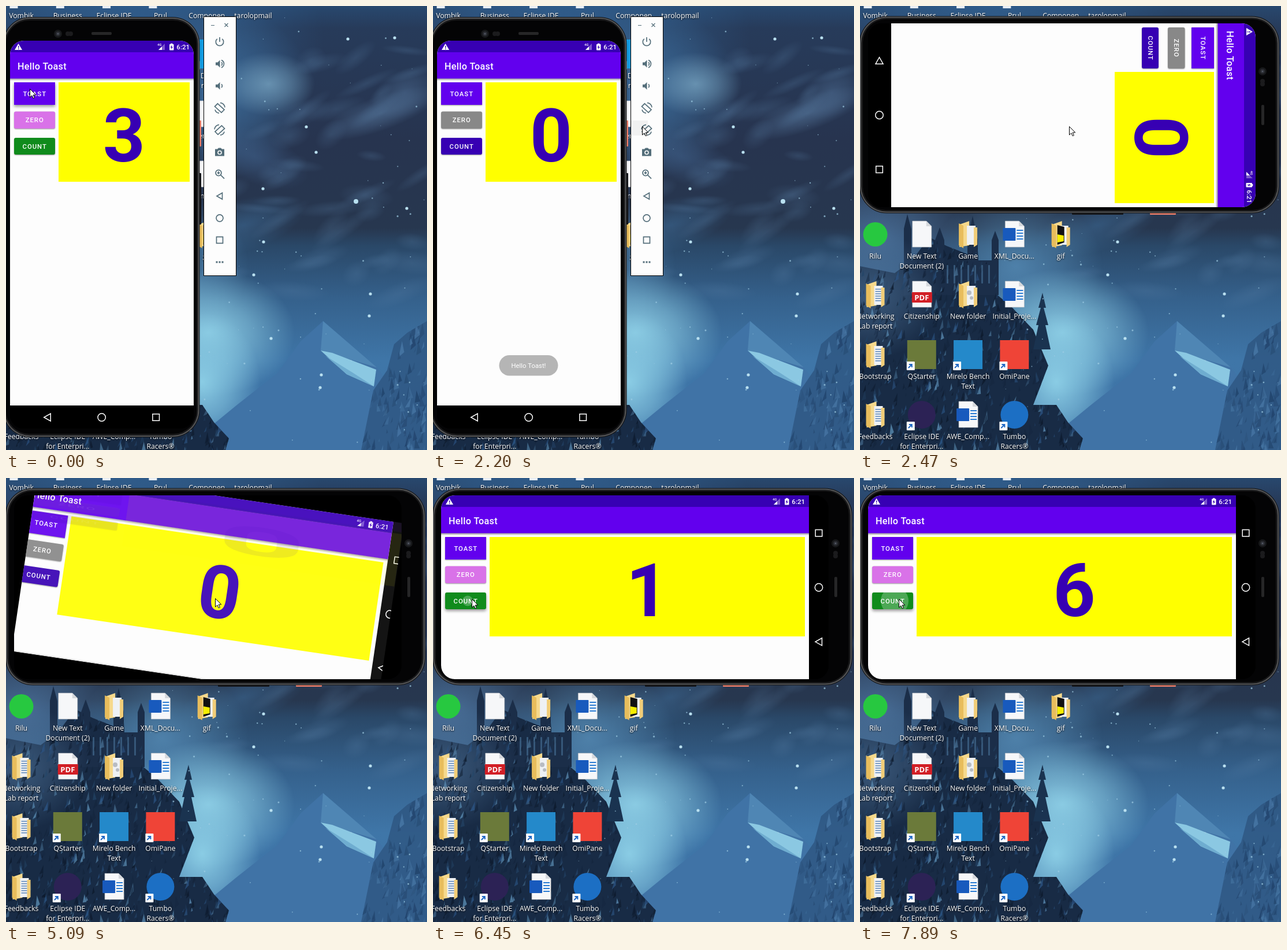
An HTML page with a canvas that plays this animation: 729x768 px, repeating every 8 s.

```html
<!DOCTYPE html>
<html lang="en">
<head>
<meta charset="utf-8">
<style>
html, body { margin: 0; width: 100%; height: 100%; overflow: hidden; }
canvas { display: block; }
</style>
</head>
<body>
<canvas id="stage" width="729" height="768"></canvas>
<script>
const stage = document.getElementById('stage');
const backdrop = document.createElement('canvas');
backdrop.width = 729; backdrop.height = 768;
let c = backdrop.getContext('2d');

let seed = 7;
const rnd = () => (seed = seed * 16807 % 2147483647) / 2147483647;

// ---- drawing helpers ----
function box(x, y, w, h, fill, r = 0) {
  c.fillStyle = fill;
  c.beginPath(); c.roundRect(x, y, w, h, r); c.fill();
}
function disc(x, y, r, fill) {
  c.fillStyle = fill;
  c.beginPath(); c.arc(x, y, r, 0, 7); c.fill();
}
function shape(d, fill, stroke, width = 1) {
  const p = new Path2D(d);
  if (fill) { c.fillStyle = fill; c.fill(p); }
  if (stroke) { c.strokeStyle = stroke; c.lineWidth = width; c.stroke(p); }
}
function text(s, x, y, font, fill, align = 'left', spacing = 0) {
  c.font = font; c.fillStyle = fill; c.textAlign = align;
  c.letterSpacing = spacing + 'px';
  c.fillText(s, x, y);
}
function at(x, y, draw, angle = 0, sx = 1, sy = sx) {
  c.save(); c.translate(x, y); c.rotate(angle); c.scale(sx, sy);
  draw(); c.restore();
}
function glow(x, y, rx, ry, rgb, alpha, angle = 0) {
  at(x, y, () => {
    const g = c.createRadialGradient(0, 0, 0, 0, 0, 1);
    g.addColorStop(0, `rgba(${rgb},${alpha})`);
    g.addColorStop(.5, `rgba(${rgb},${alpha * .55})`);
    g.addColorStop(1, `rgba(${rgb},0)`);
    c.fillStyle = g; c.fillRect(-1, -1, 2, 2);
  }, angle, rx, ry);
}

// ---- wallpaper ----
function shards(outline, x, y, w, h, count, size, colors) {
  c.save(); c.clip(new Path2D(outline));
  for (let i = 0; i < count; i++) {
    const px = x + rnd() * w, py = y + rnd() * h, s = size * (.4 + rnd());
    c.globalAlpha = .25 + rnd() * .5;
    shape(`M${px} ${py}l${s * (rnd() - .3)} ${s * 1.6}l${-s * .8} ${s * rnd()}z`,
      colors[i % colors.length]);
  }
  c.restore();
}

function wallpaper() {
  const g = c.createLinearGradient(0, 0, 0, 768);
  [[0, '#28486e'], [.05, '#273b5a'], [.3, '#27344f'], [.5, '#27374f'], [.54, '#2a4868'],
   [.66, '#35618c'], [.8, '#3f76a8'], [1, '#3d73a6']].forEach(s => g.addColorStop(...s));
  c.fillStyle = g; c.fillRect(0, 0, 729, 768);
  glow(220, 60, 330, 250, '52,104,156', .75);
  glow(370, 150, 160, 150, '62,110,156', .8);
  glow(455, 135, 80, 55, '125,170,198', .7);
  glow(650, 185, 110, 30, '88,122,160', .6, -.35);
  glow(690, 150, 60, 40, '80,112,150', .5, -.5);
  glow(430, 260, 100, 45, '62,94,135', .6, .4);
  glow(410, 380, 110, 45, '60,106,150', .6, -.3);
  glow(270, 450, 150, 130, '86,140,182', .8);
  glow(350, 565, 150, 110, '138,202,226', 1);
  glow(340, 650, 100, 120, '138,204,228', 1);
  for (let i = 0; i < 40; i++)
    glow(390 + rnd() * 340, 20 + rnd() * 480, 25 + rnd() * 40, 8 + rnd() * 14, '92,132,172', .22, rnd() - .8);

  shape('M345 735L400 690 470 635 510 580 549 545 642 625 690 690 729 768H340z', '#4073a6');
  shape('M549 545L642 625 545 596z', '#4f86b4');
  shape('M545 596L565 600 641 629 637 658 590 637z', '#8bc8e2');
  shape('M553 605L600 634 637 658 590 637z', '#6fadd0');

  const cliff = 'M636 665L660 630 672 585 695 565 729 545V768H615z';
  shape(cliff, 'rgba(45,83,126,.75)');
  shards(cliff, 610, 545, 120, 220, 160, 9, ['#1f4068', '#4a7aa8', '#274a72']);

  glow(30, 400, 170, 110, '74,112,154', .9);
  const rocks = 'M0 450L60 462 90 440 120 400 150 415 188 430 190 400 196 386 203 404 205 440 ' +
    '234 446 238 500 262 520 300 560 326 622 300 690 340 690 360 720 386 748 380 768H0z';
  shape(rocks, '#182b45');
  shape('M76 470V385l6-25 7 26V440H130V405l8-22 8 22V455H186V405l9-42 9 42V440H228V405l6-16 6 16V500H76z', '#1b2e49');
  glow(20, 500, 120, 110, '82,120,160', .6);
  shards(rocks, 0, 380, 390, 390, 1100, 7,
    ['#2d5788', '#0c1829', '#244669', '#0e1c30', '#5f93ba', '#14253d']);
  // castle arcade and pine
  c.globalAlpha = .6;
  for (let i = 0; i < 7; i++) box(150 + i * 12, 448, 3, 32, '#4a7399', 1);
  c.globalAlpha = 1;
  shape('M316 496l6 26h-4l8 30h-5l9 42h-30l9-42h-4l8-30h-4z', '#1a3350');

  // snow
  [[606, 338], [694, 350], [631, 498], [629, 536], [446, 408], [520, 209], [537, 253], [459, 575],
   [546, 638], [429, 465], [445, 316], [592, 57], [673, 55], [544, 660]]
    .forEach(([x, y], i) => disc(x, y, i ? 2.6 : 4, '#b9e0f0'));
  for (let i = 0; i < 110; i++) disc(250 + rnd() * 479, 20 + rnd() * 740, .5 + rnd() * 1.1, 'rgba(160,205,228,.7)');
}

// ---- desktop icons ----
function page() {
  shape('M-16-23H8l9 9V22H-16z', '#f6f7f9', '#b9bcc2', .7);
  shape('M8-23v9h9z', '#d5d8dc');
}
function folder() {
  shape('M-15-17L2-23V19L-15 22z', '#f6d98c');
  box(-2, -15, 15, 33, '#eef1f4');
  shape('M-16-19l8 4V24l-8-5z', '#e8bd5c');
  shape('M10-12h6V18l-6 4z', '#f1cd78');
}
function badge() {
  box(-26, 12, 14, 15, '#fff', 1);
  shape('M-23 23l6-6m-5 0h5v5', null, '#1d66c4', 2);
}
const square = color => () => { box(-25, -25, 50, 50, color); badge(); };
const round = color => () => { disc(0, 0, 24, color); badge(); };
const icons = {
  page, folder,
  doc() { page(); box(-20, -11, 22, 22, '#185abd', 1); for (let y = -8; y < 11; y += 5) box(4, y, 11, 2, '#2b7cd3'); },
  pdf() { page(); box(-17, -4, 35, 18, '#d21f26', 1); text('PDF', 0, 10, 'bold 13px "Open Sans", sans-serif', '#fff', 'center'); },
  gears() { folder(); disc(2, -3, 4, '#b8bcc2'); disc(6, 6, 3, '#b8bcc2'); },
  papers() { folder(); for (let y = -10; y < 14; y += 4) box(0, y, 10, 1.5, '#5c86b8'); },
  shots() { folder(); shape('M-6-16L6-13V14L-6 18z', '#111'); shape('M-6 0L5 2V12L-6 14z', '#f5ee00'); },
  green: () => disc(0, 0, 21, '#27c840'),
  block: square('#6b7a3a'), blue: square('#2489ca'), red: square('#ef4437'),
  cyan: square('#149be0'), indigo: round('#2c2255'), sky: round('#1c6fc4')
};
const desktop = [
  [0, 0, 'green', 'Rilu'], [1, 0, 'page', 'New Text|Document (2)'], [2, 0, 'folder', 'Game'],
  [3, 0, 'doc', 'XML_Docu...'], [4, 0, 'shots', 'gif'],
  [0, 1, 'papers', 'Networking|Lab report'], [1, 1, 'pdf', 'Citizenship'], [2, 1, 'gears', 'New folder'],
  [3, 1, 'doc', 'Initial_Proje...'],
  [0, 2, 'papers', 'Bootstrap'], [1, 2, 'block', 'QStarter'], [2, 2, 'blue', 'Mirelo Bench|Text'],
  [3, 2, 'red', 'OmiPane'],
  [0, 3, 'papers', 'Feedbacks'], [1, 3, 'indigo', 'Eclipse IDE|for Enterpri...'], [2, 3, 'doc', 'AWE_Comp...'],
  [3, 3, 'sky', 'Tumbo|Racers®'],
  [4, -3, 'cyan', 'Dex|run'], [4, -2, 'page', 'enrol'], [4, -1, 'page', 'my_'],
  [0, -4, '', 'Vombik'], [1, -4, '', 'Business'], [2, -4, '', 'Eclipse IDE'], [3, -4, '', 'Prul'],
  [4, -4, '', 'Componen'], [5, -4, '', 'tarolopmail']
];
function drawDesktop() {
  wallpaper();
  for (const [col, row, kind, label] of desktop) {
    const x = 26.5 + col * 80.3, y = 395 + row * 104;
    if (kind) at(x, y, icons[kind]);
    else if (col < 4) box(x - 20, 0, 14, 4, '#e8eef4');
    c.shadowColor = '#000'; c.shadowBlur = 3; c.shadowOffsetY = 1;
    label.split('|').forEach((line, i) =>
      text(line, x, y + 41.5 + i * 17, '12.2px "Open Sans", "Noto Sans", sans-serif', '#fff', 'center'));
    c.shadowColor = 'transparent';
  }
}

// ---- phone ----
const PURPLE = '#6200ee', DEEP = '#3700b3';

function phoneBody() {
  box(334, 198, 4, 45, '#f0806c', 1);
  box(334, 289, 4, 89, '#15161a', 1);
  box(-5.5, 19, 341, 727, '#111', 47);
  box(-4.5, 20, 339, 725, '#555658', 46);
  box(-2.5, 22, 335, 721, '#19191a', 44);
  box(0, 25, 330, 715, '#040405', 40);
  disc(90, 48, 7, '#17181a'); disc(90, 48, 4, '#2b2d33'); disc(90, 48, 1.5, '#555a66');
  disc(107, 48, 4, '#1b1b1d'); disc(112, 48, 4, '#1b1b1d');
  box(148, 45, 35, 5, '#262627', 2);
}

function button(label, y, h, fill, r, state) {
  const age = state.t - state.press[label];
  const pressed = age >= 0 && age < 250;
  c.save();
  c.shadowColor = 'rgba(0,0,0,.4)'; c.shadowBlur = pressed ? 5 : 2; c.shadowOffsetY = pressed ? 3 : 1;
  box(7, y, 71, h, fill, r);
  c.restore();
  if (age >= 0 && age < 600 && label !== 'TOAST') {
    c.save();
    c.beginPath(); c.roundRect(7, y, 71, h, r); c.clip();
    disc(46, y + h / 2, age <= 150 ? 9 + age * .1 : 80, `rgba(255,255,255,${.25 * Math.min(1, (600 - age) / 300)})`);
    c.restore();
  }
  text(label, 42.7, y + h / 2 + 4, '500 11.3px Roboto, sans-serif', '#fff', 'center', 1);
}

function app(wide, state) {
  const w = wide ? 637 : 318, h = wide ? 318 : 631;
  if (wide) box(w, 0, 34, h, '#000');
  else box(0, h, w, 40, '#000');
  box(0, 0, w, h, '#fdfdfd');
  for (let i = 0; i < 4; i++) box(0, 65, w, 1 + i, 'rgba(0,0,0,.1)');
  box(0, 0, w, 20.5, DEEP);
  box(0, 20, w, 45.5, PURPLE);
  text('Hello Toast', 13, 49.7, '500 16.2px Roboto, sans-serif', '#fff', 'left', .3);

  // status bar
  shape('M14.5 5l6.5 11h-13z', '#fff');
  box(14, 9, 1.4, 3.5, DEEP); box(14, 13.5, 1.4, 1.4, DEEP);
  text('4G', w - 63, 9, '500 6px Roboto, sans-serif', '#fff');
  shape(`M${w - 50} 5v11h-11z`, 'rgba(255,255,255,.35)');
  shape(`M${w - 55} 10v6h-6z`, '#fff');
  at(w - 42, 0, () => {
    box(0, 6, 7.5, 10.5, '#fff', 1); box(2, 4.7, 3.5, 2, '#fff');
    shape('M4.5 7.5l-3 4.2h2l-.5 3.3 3-4.2h-2z', DEEP);
  });
  text('6:21', w - 7, 15, '500 11.5px Roboto, sans-serif', '#fff', 'right');

  button('TOAST', 72, 39, PURPLE, 0, state);
  button('ZERO', 122.5, 29.5, state.n ? '#d972e8' : '#888', 3, state);
  button('COUNT', 168, 29, state.n ? '#108b1c' : DEEP, 3, state);

  box(84, 72, w - 91, 172, '#ff0');
  text(state.n, 84 + (w - 91) / 2, 209.3, 'bold 128px Roboto, sans-serif', DEEP, 'center');

  // navigation bar: positions along its length
  const nav = (pos, d) => at(...(wide ? [654, 318 - pos] : [pos, 651.5]), () => shape(d, null, '#fff', 1.5));
  nav(64.7, 'M5.5-6.5V6.5L-6 0z');
  nav(158.7, 'M6.7 0A6.7 6.7 0 1 1-6.7 0A6.7 6.7 0 1 1 6.7 0z');
  nav(252.7, 'M-5.8-5.8H5.8V5.8H-5.8z');
}

function screen(x, y, w, h, draw) {
  c.save();
  c.translate(x, y);
  c.beginPath(); c.roundRect(0, 0, w, h, 24); c.clip();
  c.fillStyle = '#000'; c.fillRect(0, 0, w, h);
  draw();
  c.restore();
}
const portrait = state => screen(7, 60, 318, 671, () => app(false, state));

// The new layout turns into place under a fading, stretched copy of the old one.
function landscape(state) {
  const turning = state.t < 5210;
  const angle = (turning ? 8.4 : state.t < 5330 ? 1 : 0) * Math.PI / 180;
  screen(14, 30, 671, 318, () => at(335.5, 159, () => {
    if (turning) { c.beginPath(); c.rect(-320, -159, 640, 318); c.clip(); }
    at(-335.5, -159, () => app(true, state));
    if (turning) {
      c.globalAlpha = .08;
      at(0, 0, () => at(-159, -335.5, () => app(false, state)), 0, 2.1, .53);
    }
  }, angle));
}

// ---- emulator side bar ----
function sideBar(hover) {
  box(342, 18, 57, 449, '#000');
  box(343, 19, 55, 447, '#fdfdfd');
  if (hover) box(343, 198, 29, 26, '#f1f1f1');
  const ink = '#546e7a';
  const speaker = 'M-7-2.5h3.5l4-4v13l-4-4H-7z';
  const tools = [
    [null, 'M-4.2-5.2A6.7 6.7 0 1 0 4.2-5.2M0-8V0'],
    [speaker, 'M3-3a4 4 0 0 1 0 6M3-6.5a7 7 0 0 1 0 13'],
    [speaker, 'M3-3a4 4 0 0 1 0 6'],
    [null, 'M-3.5-7.5L8 3 3 8-8.5-2.5zM1-9Q8-8 9-1M-1 9Q-7 8-8 3'],
    [null, 'M3.5-7.5L-8 3-3 8 8.5-2.5zM-1-9Q-8-8-9-1M1 9Q7 8 8 3'],
    ['M-8-5h4l2-2h4l2 2h4V7H-8z', ''],
    [null, 'M3-2A5 5 0 1 1-7-2A5 5 0 1 1 3-2zM2 2L8 8M-2-4.5v5M-4.5-2h5'],
    [null, 'M4.5-5.5V5.5L-5 0z'],
    [null, 'M6 0A6 6 0 1 1-6 0A6 6 0 1 1 6 0z'],
    [null, 'M-5.5-5.5H5.5V5.5H-5.5z'],
    ['M-6.5-1.5h3v3h-3zM-1.5-1.5h3v3h-3zM3.5-1.5h3v3h-3z', '']
  ];
  tools.forEach(([fill, stroke], i) => at(370, 62 + i * 38.1, () => {
    if (fill) shape(fill, ink);
    shape(stroke, null, ink, 1.7);
  }));
  disc(370, 253.5, 3.8, '#fdfdfd'); disc(370, 253.5, 2.2, ink);
  shape('M355 33.5h6M378.5 30l6 6m0-6l-6 6', null, ink, 1.2);
}

// ---- timeline ----
const steps = [0, 120, 270, 420, 540, 690, 840, 960, 1110, 1230, 1380, 1500, 1650, 1960, 2080, 2200, 2320,
  2470, 5090, 5210, 5330, 5590, 5730, 5880, 6000, 6150, 6300, 6450, 6570, 6720, 6840, 6960, 7080, 7230,
  7470, 7620, 7740, 7890];
const pointer = [[0, 41, 143], [120, 41, 168], [270, 42, 175], [420, 42, 182], [540, 42, 187], [690, 42, 190],
  [1110, 140, 196], [1230, 261, 202], [1380, 281, 200], [1500, 300, 198], [1650, 362, 208], [5590, 146, 206],
  [5730, 126, 206], [5880, 90, 208], [6000, 67, 209]];
const clicks = [6300, 6570, 6720, 6960, 7470, 7890];
const presses = [6150, 6450, 6720, 7380, 7740];
const last = (list, t, key = v => v) => list.findLast(v => key(v) <= t);

function toastAlpha(t) {
  if (t < 120 || t >= 2320) return 0;
  if (t < 540) return (t - 20) / 520;
  return t < 2080 ? 1 : t < 2200 ? .8 : .5;
}
function toast(alpha) {
  if (!alpha) return;
  c.globalAlpha = alpha;
  box(114.5, 604, 102, 35.5, '#6e6e6e', 18);
  c.globalAlpha = 1;
  text('Hello Toast!', 165.5, 626.3, '11.3px Roboto, sans-serif', '#fff', 'center');
}

function draw(now) {
  const t = last(steps, now % 8000);
  const state = {
    t,
    n: t < 960 ? 3 : clicks.filter(k => k <= t).length,
    press: { TOAST: 0, ZERO: 840, COUNT: last(presses, t) }
  };
  c.drawImage(backdrop, 0, 0);

  if (t < 2320) {
    phoneBody();
    portrait(state);
    toast(toastAlpha(t));
    sideBar(t >= 1650);
  } else if (t >= 2470) {
    at(745, 23, () => {
      phoneBody();
      if (t < 5090) portrait(state);
    }, Math.PI / 2);
    if (t >= 5090) landscape(state);
  }
  const [, x, y] = last(pointer, t, p => p[0]);
  at(x + .5, y + .5, () => shape('M0 0V14.5L3.4 11.3 5.7 16.3 7.9 15.3 5.7 10.4H10.3z', '#fff', '#000'));
}

drawDesktop();
c = stage.getContext('2d');
let start;
requestAnimationFrame(function tick(now) {
  draw(now - (start ??= now));
  requestAnimationFrame(tick);
});
</script>
</body>
</html>
```
